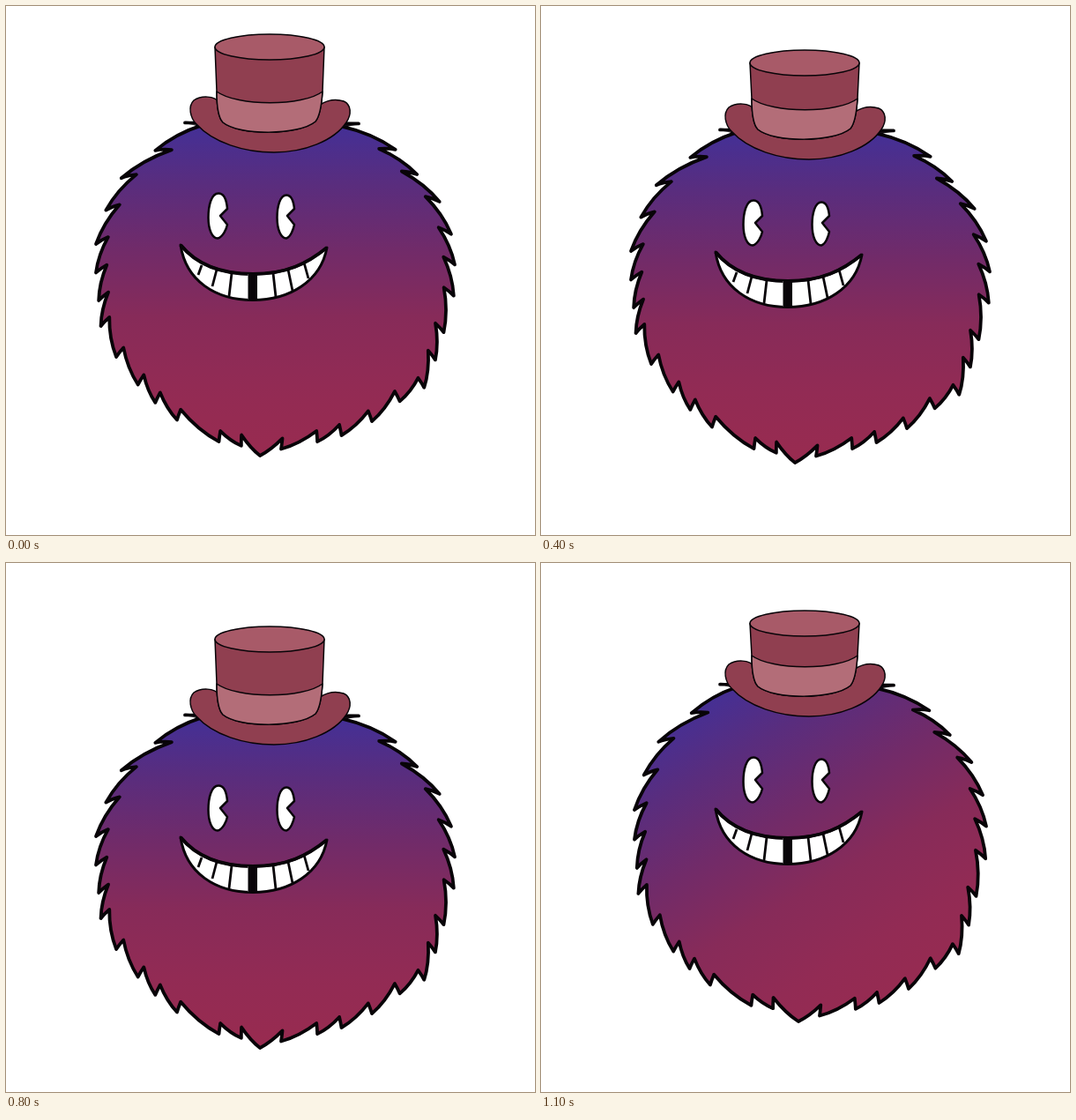
These frames come from a looping animation (600 by 600 pixels, 1200 ms). An HTML page with a canvas:

```html
<!DOCTYPE html>
<html lang="en">
<head>
<meta charset="utf-8">
<title>Bouncing furball</title>
<style>
html, body { margin: 0; width: 100%; height: 100%; overflow: hidden; background: #fff; }
canvas { display: block; }
</style>
</head>
<body>
<canvas id="stage" width="600" height="600"></canvas>
<script>
const ctx = document.getElementById('stage').getContext('2d');
const STEP = 100;

// One entry per step: body height, hat squash and fur variant
const drop = [0, 0, 0, 0, 8, 16, 32, 40, 40, 32, 16, 8];
const squash = [0, 2, 4, 6, 10, 14, 12, 5, 0, 4, 8, 14];
const variant = [0, 2, 3, 1, 0, 2, 3, 1, 0, 1, 3, 2];
const slant = [0, 20, 110, 25];

// Fur tips from the top down each side
const rightTips = [
  [400, 132], [441, 161], [465, 189], [490, 220], [503, 257], [507, 292],
  [506, 328], [495, 370], [486, 402], [474, 434], [447, 450], [416, 473],
  [382, 489], [355, 496], [314, 504], [290, 511]
];
const leftTips = [
  [203, 131], [170, 163], [132, 195], [115, 232], [104, 271], [104, 304],
  [107, 336], [109, 365], [126, 400], [150, 431], [169, 451], [193, 470],
  [240, 494], [265, 498]
];
const center = { x: 304, y: 310 };

function wobble(n, v) {
  return 2 * Math.sin(n * 12.9 + v * 4.7);
}

// Each tip is followed by a notch that leans back up the body
function furSide(tips, side, v) {
  return tips.flatMap(([x, y], i) => {
    x += wobble(i * side, v);
    y += wobble(i * side + 40, v);
    const a = Math.atan2(y - center.y, x - center.x);
    const c = Math.cos(a), s = Math.sin(a);
    const lean = (9 - 7 * s) * side;
    return [[x, y], [x - 12 * c + lean * s, y - 12 * s - lean * c]];
  });
}

function drawFur(v) {
  const right = furSide(rightTips, 1, v).slice(0, -1);
  const left = furSide(leftTips, -1, v).reverse();
  const points = [...right, ...left];
  ctx.beginPath();
  ctx.moveTo(...points[0]);
  for (let i = 1; i < points.length; i++) {
    const [x0, y0] = points[i - 1], [x1, y1] = points[i];
    const mx = (x0 + x1) / 2, my = (y0 + y1) / 2;
    const r = Math.hypot(mx - center.x, my - center.y);
    const bulge = Math.hypot(x1 - x0, y1 - y0) * 0.1 / r;
    ctx.quadraticCurveTo(mx + (mx - center.x) * bulge, my + (my - center.y) * bulge, x1, y1);
  }
  ctx.closePath();

  const fill = ctx.createLinearGradient(300 - slant[v], 125, 300 + slant[v], 505);
  ['#40309a', '#592d7e', '#712b69', '#872b59', '#922b54', '#982b50']
    .forEach((color, i, all) => fill.addColorStop(i / (all.length - 1), color));
  ctx.fillStyle = fill;
  ctx.fill();
  ctx.lineWidth = 3.8;
  ctx.stroke();
}

function shape(d, fill, width) {
  const path = new Path2D(d);
  if (fill) {
    ctx.fillStyle = fill;
    ctx.fill(path);
  }
  ctx.lineWidth = width;
  ctx.stroke(path);
}

function drawFace() {
  shape('M251 230C250 218 246 212.500 241 212.500C233 212.500 229.500 226 229.500 240C229.500 254 234 263.500 240 263.500C246 262 250 253 251 248L243 238Z', '#fff', 2.5);
  shape('M327 230C326 220 323 214.500 318 214.500C311 214.500 307.500 227 307.500 240C307.500 254 312 263.500 318 263.500C323 262 326 253 327 248L319 238Z', '#fff', 2.5);

  const upper = 'M198 271C215 292 240 304 280 304C318 304 342 292 364 274';
  shape(upper + 'C357 312 322 333.500 280 333.500C238 333.500 204 312 198 271Z', '#fff', 3);
  shape(upper, null, 4);
  shape('M222 294L218 305M239 299L234 318M256 303L253 329M303 303L306 330M320 299L325 323M338 291L343 309', null, 2.8);
  ctx.fillRect(274.5, 304, 10.5, 29);
}

function drawHat(sink) {
  const rim = 46.5 + sink;
  const dark = '#903f50';
  shape('M242 109C236 102 222 101 213 107C206 114 209 127 216 134C235 155 270 166 304 166C338 166 372 153 386 132C392 123 392 112 383 108C374 105 364 107 356 112Z', dark, 1.5);
  shape(`M237 ${rim}L239 97C239 112 240 126 246 132C264 147 332 147 351 131C356 125 358 112 359 97L361 ${rim}Z`, dark, 1.5);
  shape('M239 97C262 114 337 114 359 97C358 112 356 125 351 131C332 147 264 147 246 132C240 126 239 112 239 97Z', '#b36d78', 1.5);
  ctx.beginPath();
  ctx.ellipse(299, rim, 62, 14.5, 0, 0, Math.PI * 2);
  ctx.fillStyle = '#a85a68';
  ctx.fill();
  ctx.stroke();
}

function draw() {
  const step = Math.floor(performance.now() / STEP) % drop.length;
  ctx.clearRect(0, 0, 600, 600);
  ctx.save();
  ctx.translate(0, drop[step]);
  ctx.strokeStyle = '#080408';
  ctx.lineJoin = 'round';
  drawFur(variant[step]);
  ctx.fillStyle = '#080408';
  drawFace();
  ctx.fillStyle = '#080408';
  ctx.fillRect(274.5, 304, 10.5, 29);
  drawHat(squash[step]);
  ctx.restore();
  requestAnimationFrame(draw);
}
draw();
</script>
</body>
</html>
```
